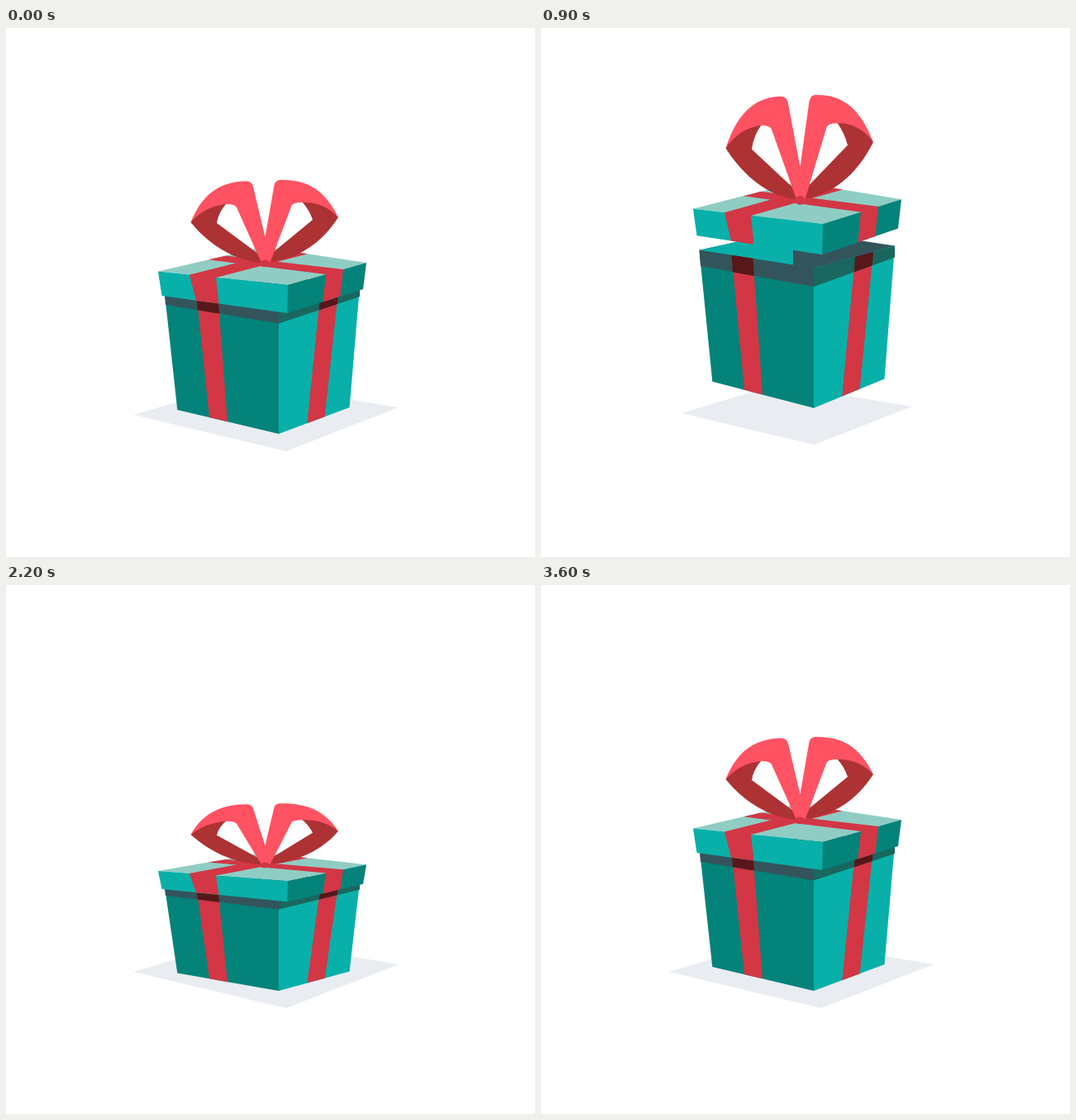
These frames come from a looping animation (640x640 px, 3800 ms). An HTML page:

```html
<!DOCTYPE html>
<html lang="en">
<head>
<meta charset="utf-8">
<title>Jumping gift box</title>
<style>
  html, body { margin: 0; width: 100%; height: 100%; overflow: hidden; background: #fff; }
  svg { display: block; width: 100%; height: 100%; }
  .light { fill: #08b0a9; }
  .deep { fill: #04837a; }
  .pale { fill: #8fcdc4; }
  .ribbon { fill: #d33645; }
  .shade { fill: #34545c; }
  .shade-right { fill: #19675f; }
  .shade-ribbon { fill: #58171a; }
  .bright { fill: #ff5263; }
  .fold { fill: #ad3233; }
</style>
</head>
<body>
<svg viewBox="0 0 640 640">
  <path id="shadow" fill="#e9edf2" d="M154.500 468L289 428L475 459L339 512Z"/>
  <g id="box">
    <!-- opening -->
    <path class="shade" d="M191.500 317L302 295L428 312.400L330 338Z"/>
    <path class="light" d="M191.500 317L302 295L305 296V336Z"/>
    <!-- walls -->
    <path class="deep" d="M191.500 317L331 337V491H330L207.300 462Z"/>
    <path class="light" d="M330 337L428 312.400L415.600 459L330 491Z"/>
    <path class="ribbon" d="M230.500 322.600L256.500 326.400L268 476.300L246 471.100Z"/>
    <path class="ribbon" d="M380 324.500L402 319L385.700 470.200L364.300 478.200Z"/>
    <!-- shade cast by the lid -->
    <path class="shade" d="M191.500 317L330 337V357.500L193 334.700Z"/>
    <path class="shade-right" d="M330 337L428 312.400V325L330 357.500Z"/>
    <path class="shade-ribbon" d="M230.500 322.600L256.500 326.400L258 345.500L232 341.200Z"/>
    <path class="shade-ribbon" d="M380 324.500L402 319L400.800 333.900L378.800 341.200Z"/>

    <g id="lid">
      <path class="pale" d="M184 294.500L310.500 265L436 284L341 311Z"/>
      <path class="light" d="M184 294.500L341.500 311L340.500 345L188.500 324Z"/>
      <path class="deep" d="M341 311L436 284L432 316L340.500 345Z"/>
      <path class="ribbon" d="M222 298.500L338 269.200L365 273.300L254 302L257.500 333.500L230 329.700Z"/>
      <path class="ribbon" d="M245 280.300L266 275.400L408 292L404.500 324.600L383.500 331.400L387 298Z"/>
      <g id="bow">
        <path class="fold" d="M223.500 235Q240 211 267 212Q257 223 255 236L307 274.500L310 284C278 282 247 264 223.500 235Z"/>
        <path class="fold" d="M402 229Q385 207 358 210Q367 220 371 232L323 271.500L318 283.500C352 279.500 382 261 402 229Z"/>
        <path class="bright" d="M223.500 235C236 204 256 186 290 185.200Q297.500 185 299 192L313.500 253L324.500 190Q326 184 332 183.800C364 183 386 196 402 229Q384 210 359 211Q347 211 345.500 215L319.500 284H309L279 217Q277 213 266 213Q240 216 223.500 235Z"/>
        <ellipse class="ribbon" cx="313.5" cy="285" rx="6" ry="4.300"/>
      </g>
    </g>
  </g>
</svg>
<script>
const LOOP = 3800, STEP = 100, LAST = 3600, JUMP = 1840;
const GROUND = 491, KNOT = 284;
const CROUCHED = 335, TAKEOFF = 380, APEX = 780, FALL = 168;
const { sin, cos, PI, min, max, floor } = Math;
const [shadow, box, lid, bow] = ['shadow', 'box', 'lid', 'bow'].map(id => document.getElementById(id));

const progress = (t, from, to) => min(1, max(0, (t - from) / (to - from)));
const outSine = u => sin(u * PI / 2);
const inOut = u => (1 - cos(u * PI)) / 2;

// Slows down on the way up, falls with constant acceleration.
function height(t) {
  return 64 * (outSine(progress(t, TAKEOFF, APEX)) - progress(t, APEX, APEX + FALL) ** 2);
}

// Crouch, stretch in the air, squash on landing, settle.
function stretch(t) {
  return 1 - .3 * inOut(progress(t, 0, CROUCHED))
    + .46 * outSine(progress(t, CROUCHED, 810))
    - .34 * inOut(progress(t, 810, 1130))
    + .19 * inOut(progress(t, 1130, 1340))
    - .01 * inOut(progress(t, 1340, 1600));
}

// The lid floats off and drops back in one soft bump.
const lift = t => 25.3 * sin(PI * progress(t, 700, 1080)) ** 2;

// The bow trails the box and swings until it comes to rest.
function bowStretch(t) {
  const fade = 1 - progress(t, 1300, 1750) ** 2;
  return 1 - .22 * fade * sin(PI * max(0, t - 480) / 340);
}

const scaleY = (y, s, to = y) => `translate(0 ${to}) scale(1 ${s}) translate(0 ${-y})`;

function draw(time) {
  const t = min(LAST, floor(time % LOOP / STEP) * STEP) % JUMP;
  const h = height(t), s = stretch(t);
  shadow.setAttribute('transform', `translate(272 452) scale(${1 - .0041 * h}) translate(-272 -452)`);
  box.setAttribute('transform', scaleY(GROUND, s, GROUND - h));
  lid.setAttribute('transform', `translate(0 ${-lift(t) / s})`);
  bow.setAttribute('transform', scaleY(KNOT, bowStretch(t)));
}

const start = performance.now();
function tick() {
  draw(performance.now() - start);
  requestAnimationFrame(tick);
}
tick();
</script>
</body>
</html>
```
